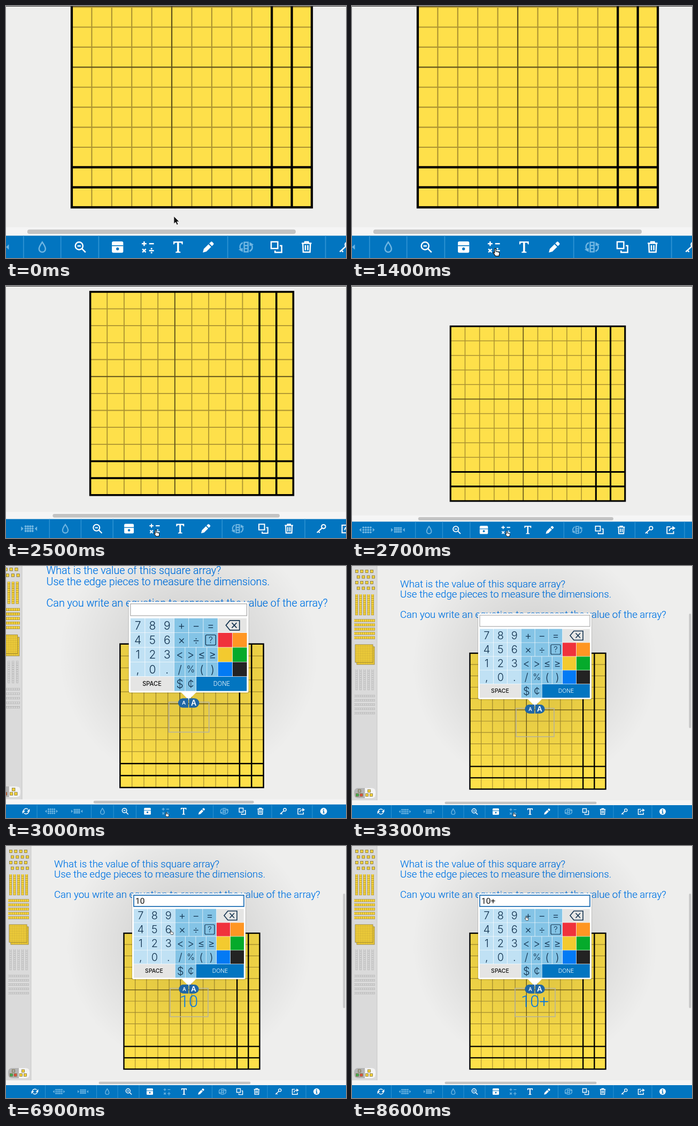
Animation, 636 px wide and 471 px high, one loop 9 s. Source, as an HTML page:

```html
<!DOCTYPE html>
<html lang="en">
<head>
<meta charset="utf-8">
<title>Array keypad</title>
<style>
  html, body { margin: 0; width: 100%; height: 100%; overflow: hidden; background: #eeeeed; }
  svg { display: block; width: 636px; height: 471px; }
  .prompt, #label { font-family: Roboto, sans-serif; font-weight: 300; fill: #0076e6; }
  .prompt { font-size: 18.67px; stroke: #0076e6; stroke-width: .2px; }
  #label { font-size: 31px; text-anchor: middle; }
  #typed { font: 15.5px Roboto, sans-serif; fill: #111; }
  .key { font-family: Inter, sans-serif; font-weight: 300; text-anchor: middle; fill: #12324f; }
  .icon { fill: none; stroke: currentColor; stroke-width: 1.4; }
  .icon .f { fill: currentColor; stroke: none; }
  .icon .b { fill: #0275c0; stroke: none; }
</style>
</head>
<body>
<svg viewBox="0 0 636 471">
  <defs>
    <radialGradient id="shade">
      <stop offset="0" stop-opacity=".16"/>
      <stop offset="1" stop-opacity="0"/>
    </radialGradient>
  </defs>
  <g id="world"></g>
  <rect id="edge" width="636" height="1" fill="#333"/>
</svg>
<script>
const $ = id => document.getElementById(id);
const BLUE = '#0275c0', YELLOW = '#fee04a', DIM = '#70b6e2';
const times = (n, f) => Array.from({ length: n }, (_, i) => f(i)).join('');
const rect = (x, y, w, h, fill, more = '') =>
  `<rect x="${x}" y="${y}" width="${w}" height="${h}" fill="${fill}" ${more}/>`;
const line = (d, stroke, width, more = '') =>
  `<path d="${d}" fill="none" stroke="${stroke}" stroke-width="${width}" ${more}/>`;
const text = (x, y, s, cls, more = '') => `<text x="${x}" y="${y}" class="${cls}" ${more}>${s}</text>`;

// Square array of 12 by 12 cells
function grid() {
  const x = 220.5, y = 163, size = 254, cell = size / 12;
  const both = i => `M${x + i * cell} ${y}v${size}M${x} ${y + i * cell}h${size}`;
  return rect(x, y, size, size, YELLOW) +
    line([1, 2, 3, 4, 6, 7, 8, 9].map(both).join(''), '#ab9231', 1.2) +
    line(both(5), '#61531b', 1.3) +
    line([10, 11].map(both).join(''), '#000', 2.4) +
    rect(x, y, size, size, 'none', 'stroke="#000" stroke-width="2.4"');
}

function bar(d, width, edge, fill) {
  return line(d, edge, width) + line(d, fill, width - 1, 'stroke-dasharray="3.4 .5"');
}

function tile(x, y, fill, s = 5) {
  return rect(x, y, s, s, fill, 'stroke="#6e6128" stroke-width=".7"');
}

function sidebar() {
  const edge = '#8a7526', amber = '#f6d33c';
  const sheet = (x, y) => rect(x, y, 33, 33, amber, `stroke="${edge}" stroke-width=".8"`) +
    line(times(9, i => `M${x + 3.3 * (i + 1)} ${y}v33M${x} ${y + 3.3 * (i + 1)}h33`), '#b89c30', .5);
  return rect(0, 0, 47, 447, '#dadada') + rect(46, 0, 1.5, 447, '#cfcfcf') +
    times(16, i => {
      const row = i >> 2;
      return tile(6.5 + (i & 3) * 9.3 + (row & 1) * 3, 7.5 + row * 10.5, amber);
    }) +
    times(5, i => bar(`M${8.5 + i * 7.5} 53v39`, 5, edge, amber)) +
    times(5, i => bar(`M4 ${102 + i * 8}h39`, 5, edge, amber)) +
    sheet(9, 151) + sheet(6, 147) +
    times(5, i => bar(`M${8.5 + i * 7.5} 193v39`, 3.6, '#a2a2a2', '#dadada')) +
    times(5, i => bar(`M4 ${243 + i * 8}h39`, 3.6, '#a2a2a2', '#dadada')) +
    rect(4, 415, 40, 19, '#b4b4b4', 'rx="7"') +
    '<path d="M24 415h13q7 0 7 7v5q0 7-7 7h-13z" fill="#f4f4f4"/>' +
    tile(11.5, 418, '#aaa') + tile(7.5, 425.5, '#3fae55') + tile(15, 425.5, '#e2503f') +
    tile(29.5, 418, amber) + tile(25.5, 425.5, amber) + tile(33.5, 425.5, amber);
}

function toolbar() {
  const icon = (x, body, color = '#fff', more = '') =>
    `<g class="icon" transform="translate(${x} 459)" color="${color}" ${more}>${body}</g>`;
  const p = (d, cls = '') => `<path class="${cls}" d="${d}"/>`;
  const dots = (pitch, r) => times(12, i =>
    `<circle class="f" cx="${(i % 4 - 1.5) * pitch}" cy="${((i >> 2) - 1) * pitch}" r="${r}"/>`);
  return rect(0, 438, 636, 9, '#f5f5f5') + rect(173.5, 440.5, 284, 4.6, '#c3c3c3', 'rx="2.3"') +
    rect(0, 447, 636, 25, BLUE) +
    line([73.5, 169.5, 209, 249, 385.5, 489, 561].map(x => `M${x} 447v25`).join(''), '#2f93d3', 1) +
    icon(54, p('M-4.6 1A4.7 4.7 0 0 1 3.4-3.2M4.6-1A4.7 4.7 0 0 1-3.4 3.2') +
      p('M6.4-4.4V.8H1.2zM-6.4 4.4V-.8h5.2z', 'f'), '#fff', 'stroke-width="1.8"') +
    icon(99, dots(3.5, 1.5) + p('M-8.3-2.8v5.6l-3-2.8zM8.3-2.8v5.6l3-2.8z', 'f'), DIM) +
    icon(144, dots(2.9, 1.35) + p('M-10-2.8v5.6l3-2.8zM10-2.8v5.6l-3-2.8z', 'f'), DIM) +
    icon(189.3, p('M0-5.2C1.8-2.4 3.4-.6 3.4 2A3.4 3.4 0 0 1-3.4 2C-3.4-.6-1.8-2.4 0-5.2Z'), DIM) +
    icon(229.5, '<circle cx="-1.2" cy="-1.2" r="4"/>' + p('M1.8 1.8L5.6 5.6M-3-1.2H.6')) +
    icon(269, rect(-6, -6, 12, 12, '', 'rx="1.5" class="f"') + rect(-6, -1.9, 12, .9, '', 'class="b"') +
      '<circle class="b" cy="1.9" r="1.5"/>') +
    icon(301, p('M-6.4-3.6h5M-3.9-6v4.8M1.4-3.6h5M-5.7 2l3.6 3.6m0-3.6l-3.6 3.6M1.4 3.8h5') +
      '<circle class="f" cx="3.9" cy="1.7" r=".9"/><circle class="f" cx="3.9" cy="5.9" r=".9"/>',
      '#fff', 'id="math"') +
    icon(333, p('M-5-6H5V-2.8H4Q3.8-4.6 2.5-4.6H1V4.2Q1 5 2.6 5V6H-2.6V5Q-1 5-1 4.2V-4.6H-2.5Q-3.8-4.6-4-2.8H-5Z', 'f')) +
    icon(365, p('M-5.8 5.8l1-3.8 5-5 2.8 2.8-5 5zM1-3.8l1.6-1.6q.8-.8 1.6 0l1.2 1.2q.8.8 0 1.6L3.8-1z', 'f')) +
    icon(405, rect(-2, -5, 4, 10, 'none') + p('M-2-1.6h4M-2 1.6h4') +
      p('M-3.6-4.6Q-8-2-5.8 2.6M3.6 4.6Q8 2 5.8-2.6') +
      p('M-8 2.6l4.4-1.6v4.2zM8-2.6l-4.4 1.6v-4.2z', 'f'), DIM) +
    icon(437, p('M-5.5-5.5h7v7h-7zM3.6-1.4h2v7h-7v-2')) +
    icon(469, p('M-5.2-4h10.4M-1.8-4v-1.5h3.6v1.5M-4-4l.4 9.4h7.2L4-4M-1.3-2v5.4M1.3-2v5.4')) +
    icon(509.5, '<circle cx="2.8" cy="-2.6" r="2.5"/>' + p('M1-.8L-5.4 5M-3.6 3.4l1.7 1.8')) +
    icon(541, p('M-.5-4.4h-5v9.6h9.6v-3.4M-2.2 1.8Q-1.8-2.4 3-2.6') + p('M2.4-5.8L6.8-2.6 2.4.6z', 'f')) +
    icon(581, '<circle class="f" r="6"/>' + p('M-1.7-1.3H.9v4h1v1h-3.6v-1h1v-3h-1zM-.9-4h1.8v1.7h-1.8z', 'b'));
}

function keypad() {
  const rows = [117.6, 143.4, 169.3, 195.1, 221], h = 25.2, left = 239;
  const LIGHT = '#c0e1f4', OP = '#84c4e6', GRAY = '#e5e5e4';
  const key = (x, row, w, fill, s = '', size = 20) => rect(x, rows[row], w - .7, h, fill) +
    (s && text(x + w / 2, rows[row] + 12.6 + size * .36, s, 'key', `font-size="${size}"`));
  const run = (chars, row, x, w, fill) => [...chars].map((c, i) =>
    key(x + i * w, row, w, fill, c.replace('<', '&lt;'), c === '%' ? 16 : 20)).join('');
  const swatch = ['#f0323c', '#ff9623', '#f3ca2f', '#05aa2b', '#037af4', '#232323'];
  return '<circle cx="342" cy="185" r="230" fill="url(#shade)"/>' +
    rect(235, 89.5, 214, 161, '#000', 'rx="4" opacity=".15"') +
    rect(236, 88.5, 212, 160.5, '#fff', 'rx="3"') + '<path d="M328 248h28l-14 14z" fill="#fff"/>' +
    rect(239, 92, 206, 21, '#fff', 'id="field"') +
    ['789', '456', '123', ',0.'].map((s, i) => run(s, i, left, 25.9, LIGHT)).join('') +
    run('+−=', 0, 316.6, 25.8, OP) + run('×÷', 1, 316.6, 25.8, OP) +
    key(368.2, 1, 25.8, OP, '?', 15) +
    rect(372, 147, 18, 18, 'none', 'rx="2" stroke="#12324f" stroke-width="1.2"') +
    run('<>≤≥', 2, 316.6, 19.35, OP) + run('/%()', 3, 316.6, 19.35, OP) + run('$¢', 4, 316.6, 19.5, OP) +
    key(394, 0, 51.5, GRAY) + line('M408 130l7-8.5h17v17h-17zM418.5 125.5l8.5 9m0-9l-8.5 9', '#12324f', 1.6) +
    swatch.map((c, i) => key(394 + i % 2 * 25.9, 1 + (i >> 1), 25.9, c)).join('') +
    key(left, 4, 77.6, GRAY) + text(277, 237, 'SPACE', 'key', 'style="font-size:10.5px;font-weight:500;fill:#111"') +
    key(355.6, 4, 89.9, BLUE) + text(400.5, 237, 'DONE', 'key', 'style="font-size:10.5px;fill:#fff"') +
    rect(0, 266, 71, 53, 'none', 'id="frame" stroke="#b5b2a0" stroke-width="1.5"') +
    '<text id="label" x="342" y="300.5"></text>' +
    '<path d="M341.3 259h-9.5a8.4 8.4 0 0 0 0 16.8h9.5zM342.7 259h9.5a8.4 8.4 0 0 1 0 16.8h-9.5z" fill="#1f66a5"/>' +
    text(333.5, 270.6, 'A', 'key', 'style="font-size:9px;font-weight:600;fill:#fff"') +
    text(351, 272.2, 'A', 'key', 'style="font-size:13.5px;font-weight:600;fill:#fff"') +
    '<text id="typed" x="242" y="108"></text>' + rect(0, 95, 1, 15, '#222', 'id="caret"');
}

const cursors = {
  arrow: '<path d="M0 0v8.2l1.9-1.7 1.3 2.9 1.5-.7-1.3-2.8h2.5z" fill="#111" stroke="#fff" stroke-width=".5"/>',
  hand: '<path d="M-.7.6q.7-1.2 1.4 0v2.6l3 .6q1 .3.8 1.4l-.6 2.8H.3L-2 4.8q-.2-1 .6-.8l.7.6z" fill="#fff" stroke="#111" stroke-width=".7"/>',
  beam: line('M-1.8-3.5q1.8 0 1.8 1v5q0 1-1.8 1M1.8-3.5q-1.8 0-1.8 1v5q0 1 1.8 1', '#333', .8)
};

$('world').innerHTML = grid() +
  text(90, 39.5, 'What is the value of this square array?', 'prompt') +
  text(90, 58.7, 'Use the edge pieces to measure the dimensions.', 'prompt') +
  text(90, 97.2, 'Can you write an equation to represent the value of the array?', 'prompt') +
  sidebar() + rect(630.5, 89, 3.8, 214, '#c6c6c6', 'rx="1.9"') +
  `<g id="pad">${keypad()}</g>` + toolbar() + '<g id="cursor"></g>';

const ease = (t, a, b) => {
  const u = Math.min(1, Math.max(0, (t - a) / (b - a)));
  return u * u * (3 - 2 * u);
};

// Cursor travel: start, end, destination
const moves = [
  [900, 1400, 302.5, 460.5], [3600, 4500, 295, 100], [4900, 5600, 250, 181],
  [5800, 6400, 277, 207], [6600, 7100, 325.5, 131]
];
// Focus of the field and key presses
const strokes = [[4650, ''], [5750, '1'], [6450, '10'], [7350, '10+']];
const OPEN = 2850;

function drawCursor(t) {
  let x = 328.5, y = 426.3;
  for (const [a, b, toX, toY] of moves) {
    const p = ease(t, a, b);
    x += (toX - x) * p;
    y += (toY - y) * p;
  }
  const padOpen = t >= OPEN;
  const kind = padOpen && y > 91 && y < 114 ? 'beam'
    : y > 447 || padOpen && y > 116 && y < 247 ? 'hand' : 'arrow';
  $('cursor').innerHTML = cursors[kind];
  $('cursor').setAttribute('transform', `translate(${x} ${y})`);
}

function draw(t) {
  const zoom = 1 + .768 * (1 - ease(t, 2085, 3298)) ** 1.38;
  $('world').setAttribute('transform', `translate(347.5 470) scale(${zoom}) translate(-347.5 -470)`);

  const padOpen = t >= OPEN;
  $('edge').style.display = padOpen ? 'none' : '';
  $('pad').style.display = padOpen ? '' : 'none';
  $('math').setAttribute('color', padOpen ? DIM : '#fff');

  const [since, value] = strokes.filter(s => t >= s[0]).pop() || [0, ''];
  $('typed').textContent = $('label').textContent = value;
  $('field').setAttribute('stroke', since ? '#2472b5' : '#9a9a9a');
  $('field').setAttribute('stroke-width', since ? 1.8 : 1);
  const width = value.length > 2 ? 75 : 71;
  $('frame').setAttribute('x', 342.5 - width / 2);
  $('frame').setAttribute('width', width);
  const caretOn = since && (t - since) % 824 < 412;
  $('caret').style.display = caretOn ? '' : 'none';
  if (caretOn) $('caret').setAttribute('x', 241 + $('typed').getComputedTextLength());

  drawCursor(t);
}

function tick() {
  draw(performance.now() % 9000);
  requestAnimationFrame(tick);
}
tick();
</script>
</body>
</html>
```
